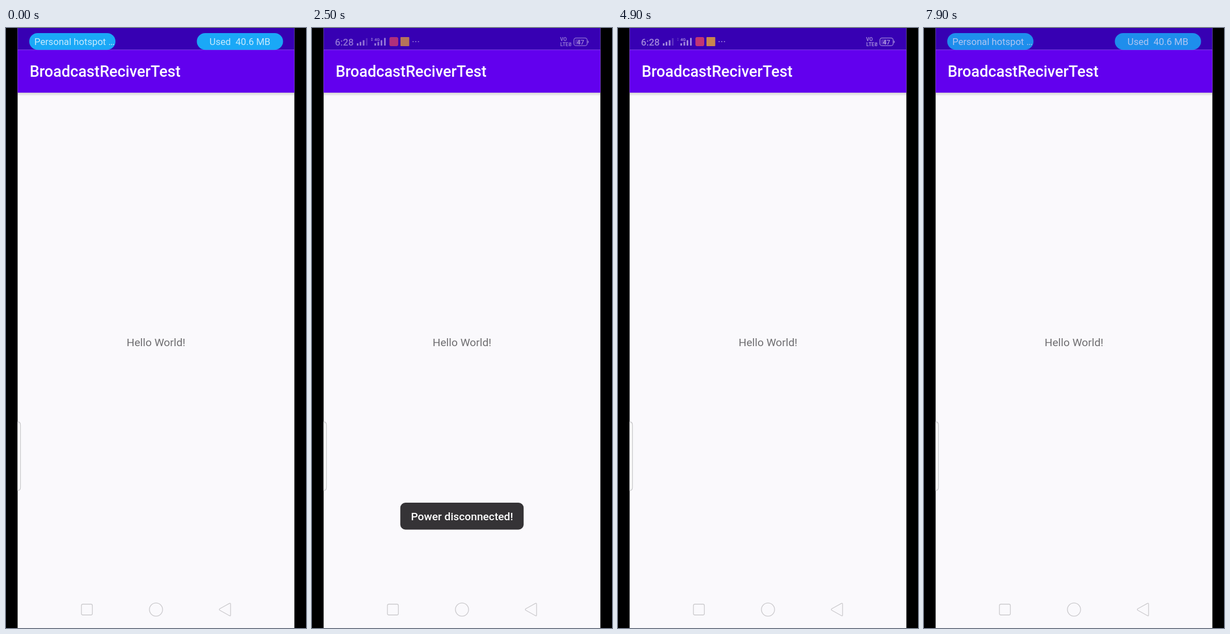
An HTML page for the animation above (8 s loop, 529 by 1058 pixels).

```html
<!DOCTYPE html>
<html lang="en">
<head>
<meta charset="utf-8">
<title>Broadcast receiver demo</title>
<style>
  html, body { margin: 0; width: 100%; height: 100%; overflow: hidden; background: #000; }
  svg { display: block; width: 100%; height: 100%; font-family: Roboto, sans-serif; }
  .medium { font-weight: 500; }
  .middle { text-anchor: middle; }
  .nav { fill: none; stroke: #cbcacd; stroke-width: 1.3; stroke-linejoin: round; }

  /* Fades advance in 100 ms steps: 1.25% of the 8 s loop. */
  #pills, #icons, #toast, #arrows { animation: 8s step-end infinite; }
  #pills { animation-name: pills; }
  #icons { animation-name: icons; }
  #toast { animation-name: toast; }
  #arrows { animation-name: arrows; }

  @keyframes pills {
    0% { opacity: 1; }
    22.5% { opacity: .91; }
    23.75% { opacity: .72; }
    25% { opacity: .46; }
    26.25% { opacity: .21; }
    27.5% { opacity: .05; }
    28.75% { opacity: 0; }
    70% { opacity: .1; }
    71.25% { opacity: .35; }
    72.5% { opacity: .63; }
    73.75% { opacity: .87; }
    75% { opacity: 1; }
    98.75%, 100% { opacity: .85; }
  }
  @keyframes icons {
    0% { opacity: 0; }
    28.75% { opacity: .1; }
    30% { opacity: .35; }
    31.25% { opacity: .65; }
    32.5% { opacity: .9; }
    33.75% { opacity: 1; }
    60% { opacity: .92; }
    61.25% { opacity: .75; }
    62.5% { opacity: .47; }
    63.75% { opacity: .22; }
    65% { opacity: .06; }
    66.25%, 100% { opacity: 0; }
  }
  @keyframes toast {
    0% { opacity: 0; }
    26.25% { opacity: .16; }
    27.5% { opacity: .41; }
    28.75% { opacity: .68; }
    30% { opacity: .9; }
    31.25% { opacity: 1; }
    50% { opacity: .95; }
    51.25% { opacity: .8; }
    52.5% { opacity: .57; }
    53.75% { opacity: .32; }
    55% { opacity: .13; }
    56.25% { opacity: .03; }
    57.5%, 100% { opacity: 0; }
  }
  @keyframes arrows {
    0% { opacity: 1; }
    43.75%, 100% { opacity: .35; }
  }
</style>
</head>
<body>
<svg viewBox="0 0 529 1058">
  <defs>
    <linearGradient id="shadow" x2="0" y2="1">
      <stop stop-color="#000" stop-opacity=".16"/>
      <stop offset="1" stop-color="#000" stop-opacity="0"/>
    </linearGradient>
  </defs>

  <rect width="529" height="1058"/>
  <rect x="20.5" width="488" height="1058" fill="#faf9fc"/>
  <rect x="20.5" width="488" height="38.5" fill="#3700b3"/>
  <rect x="20.5" y="38.5" width="488" height="75.5" fill="#6200ee"/>
  <rect x="20.5" y="114" width="488" height="6" fill="url(#shadow)"/>
  <text class="medium" x="41.7" y="86.3" font-size="27.1" fill="#fff">BroadcastReciverTest</text>
  <text class="middle" x="264.5" y="561" font-size="19.2" fill="#6f6e71">Hello World!</text>

  <path d="M20.5 694.5Q25.5 694.5 25.5 700V810Q25.5 815.5 20.5 815.5" fill="#fdfdfd" stroke="#c9c9cb" stroke-width="1.3"/>
  <g class="nav">
    <rect x="133" y="1016" width="19.3" height="19" rx="2.5"/>
    <circle cx="264.5" cy="1025.5" r="11.6"/>
    <path d="M377 1024L394 1014.6Q396 1013.8 396 1016V1035Q396 1037.2 394 1036.2L377 1026.8Q375.4 1025.4 377 1024Z"/>
  </g>

  <g id="pills" font-size="16.65">
    <rect x="41" y="9" width="152" height="29.4" rx="14.7" fill="#1aa8f7"/>
    <rect x="336.5" y="9" width="152" height="29.4" rx="14.7" fill="#1aa8f7"/>
    <g fill="#fff" fill-opacity=".75">
      <text x="50" y="30">Personal hotspot …</text>
      <text class="middle" x="412.5" y="30">Used&#160;&#160;40.6 MB</text>
    </g>
  </g>

  <g id="icons">
    <g fill="#c3b2e8">
      <text class="medium" x="40.6" y="30.8" font-size="16.7">6:28</text>
      <path d="M79 27h3v4h-3zM84 24.5h3v6.5h-3zM89.5 21.5h3v9.5h-3z"/>
      <path d="M95 18h3v13h-3z" opacity=".35"/>
      <path d="M110 27h3v4h-3zM115.5 24.5h3v6.5h-3zM121 21.5h3v9.5h-3zM127 17.5h3v13.5h-3z"/>
      <text x="110" y="23.4" font-size="7.6" font-weight="700">4G</text>
      <path id="arrows" d="M103.8 19.4l1.8-2.4 1.8 2.4zM103.8 20.8l1.8 2.4 1.8-2.4z"/>
      <circle cx="178.3" cy="24" r="1.1"/>
      <circle cx="183" cy="24" r="1.1"/>
      <circle cx="187.7" cy="24" r="1.1"/>
      <g font-size="8.7" font-weight="700">
        <text x="437.6" y="23.2">VO</text>
        <text x="437.8" y="32">LTE</text>
      </g>
      <path d="M453.4 26h3.2v5.4h-3.2zM455.7 26.4l-1.5 4.2" fill="none" stroke="#c3b2e8"/>
      <rect x="464" y="20" width="9.5" height="9" rx="1.5" opacity=".3"/>
      <rect x="461.8" y="17.6" width="23.4" height="13.6" rx="3.8" fill="none" stroke="#c3b2e8" stroke-width="1.3"/>
      <path d="M486.3 22q1.7.3 1.7 2.4t-1.7 2.4z"/>
      <text class="medium middle" x="473.5" y="28.5" font-size="11.3" fill="#ded5f2">47</text>
    </g>
    <rect x="136.5" y="16" width="15.5" height="16" rx="3" fill="#f2495f"/>
    <rect x="156" y="16" width="15.5" height="16" rx="1" fill="#fbb32b"/>
  </g>

  <g id="toast">
    <rect x="155.7" y="837" width="217.5" height="47.5" rx="9" fill="#353336"/>
    <text class="medium middle" x="264.5" y="868" font-size="19.2" fill="#fff">Power disconnected!</text>
  </g>
</svg>
</body>
</html>
```
